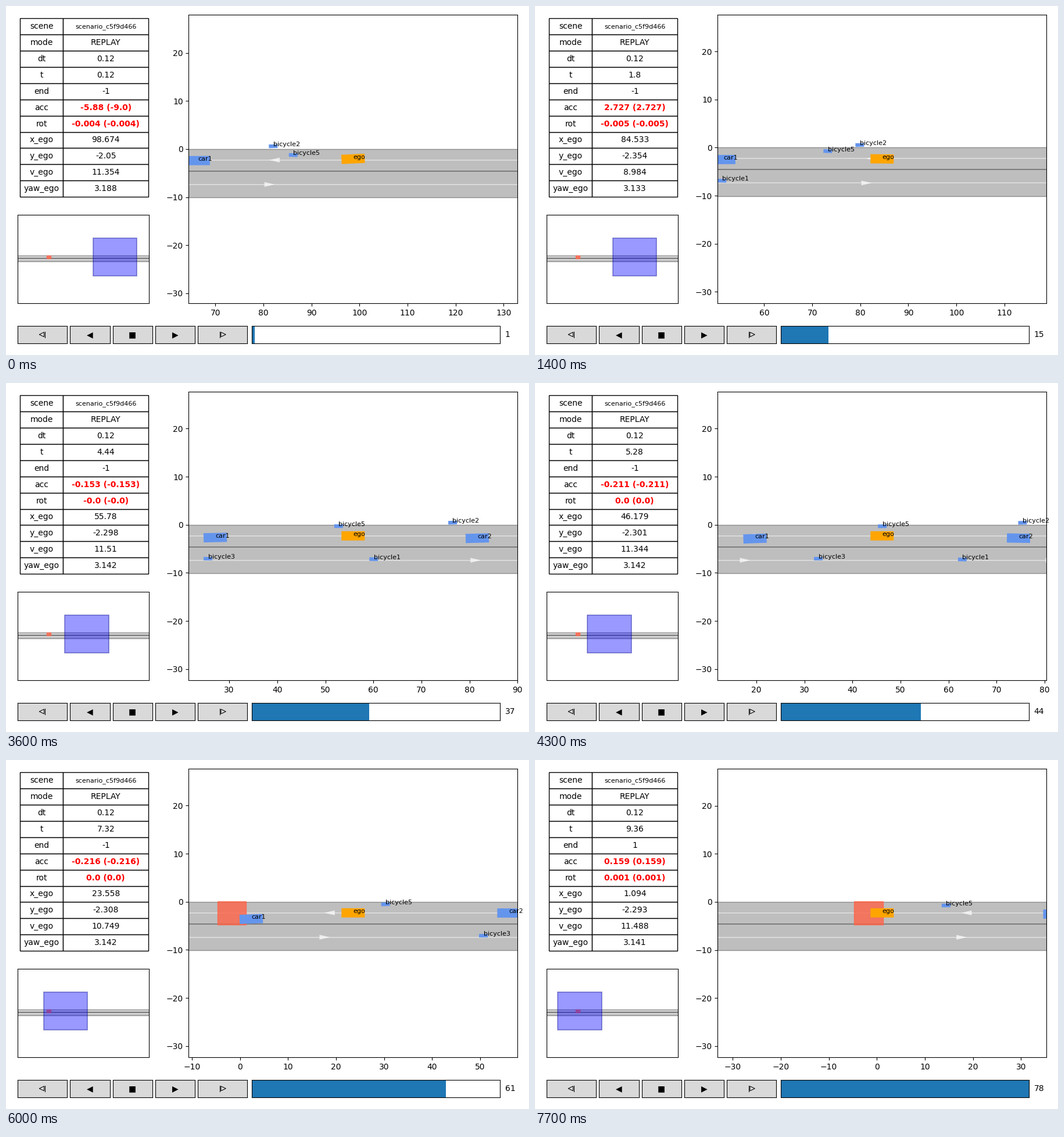
Animation of 900 by 600 pixels, one loop 7.8 s. Source, as a matplotlib script:

```python
import numpy as np
import matplotlib.pyplot as plt
from numpy.polynomial import Polynomial
from matplotlib.animation import FuncAnimation
from matplotlib.patches import Polygon, Rectangle

plt.rcParams["font.family"] = "DejaVu Sans"

W, H = 900, 600
STEPS, DT = 78, 0.12
VIEW_Y = 30
VIEW_X = VIEW_Y * 566 / 496
LANES = {-2.29: -1, -7.37: 1}  # lane centre: driving direction
CAR, BIKE = (4.84, 1.92), (1.8, 0.76)

# ego key states: t, x, y, speed, yaw, acceleration, yaw change per step
EGO = np.array([
    (0.12, 98.674, -2.050, 11.354, 3.188, -5.880, -0.004),
    (1.80, 84.533, -2.354, 8.984, 3.133, 2.727, -0.005),
    (3.36, 68.228, -2.273, 11.442, 3.143, 0.406, 0.001),
    (6.24, 35.382, -2.315, 11.151, 3.142, -0.205, -0.001),
    (9.36, 1.094, -2.293, 11.488, 3.141, 0.159, 0.001),
])

# name: (size, time span, waypoints as t, x, y)
ACTORS = {
    "car1": (CAR, (0, 8.2), [(0.12, 66.44, -2.41), (1.8, 51.57, -2.5),
                             (4.44, 27.08, -2.65), (7.32, 2.35, -3.58)]),
    "car2": (CAR, (2.3, 10), [(3.36, 89.88, -2.4), (4.44, 81.63, -2.78),
                              (7.32, 55.99, -2.34), (9.36, 37.05, -2.53)]),
    "bicycle1": (BIKE, (0, 10), [(1.8, 51.2, -6.9), (6.24, 66.1, -7.3)]),
    "bicycle2": (BIKE, (0, 10), [(0.12, 82.04, 0.58), (4.44, 76.49, 0.45)]),
    "bicycle3": (BIKE, (0, 10), [(4.44, 25.57, -7.03), (7.32, 50.73, -7.03)]),
    "bicycle5": (BIKE, (0, 10), [(0.12, 86.21, -1.26), (3.36, 61.15, -0.37),
                                 (9.36, 14.4, -0.75)]),
}


def quintic(u, T, start, end):
    """Position, velocity, acceleration at u in 0..1 between two full states."""
    (p0, v0, a0), (p1, v1, a1) = start, end
    d = p1 - p0 - v0 * T - a0 * T * T / 2
    e = (v1 - v0 - a0 * T) * T
    f = (a1 - a0) * T * T
    poly = Polynomial([p0, v0 * T, a0 * T * T / 2, 10 * d - 4 * e + f / 2,
                       -15 * d + 7 * e - f, 6 * d - 3 * e + f / 2])
    return poly(u), poly.deriv()(u) / T, poly.deriv(2)(u) / T ** 2


def axis_states(row):
    _, x, y, v, yaw, acc, rot = row
    c, s, w = np.cos(yaw), np.sin(yaw), rot / DT
    return (x, v * c, acc * c - v * s * w), (y, v * s, acc * s + v * c * w)


def ego_state(t):
    times = EGO[:, 0]
    k = np.clip(np.searchsorted(times, t - 1e-6) - 1, 0, len(times) - 2)
    T = times[k + 1] - times[k]
    u = (t - times[k]) / T
    (x, vx, ax), (y, vy, ay) = (
        quintic(u, T, a, b)
        for a, b in zip(axis_states(EGO[k]), axis_states(EGO[k + 1])))
    v = np.hypot(vx, vy)
    yaw = np.arctan2(vy, vx) % (2 * np.pi)
    acc = (vx * ax + vy * ay) / v
    rot = (vx * ay - vy * ax) / v ** 2 * DT
    return [float(n) for n in (x, y, v, yaw, acc, rot)]


def glide(t, points):
    """Point and velocity on a smooth path, straight beyond its ends."""
    points = np.array(points)
    ts, ps = points[:, 0], points[:, 1:]
    m = np.gradient(ps, ts, axis=0)
    if not ts[0] < t < ts[-1]:
        k = 0 if t <= ts[0] else -1
        return ps[k] + m[k] * (t - ts[k]), m[k]
    k = np.searchsorted(ts, t) - 1
    T = ts[k + 1] - ts[k]
    u, dp = (t - ts[k]) / T, ps[k + 1] - ps[k]
    a, b = m[k] * T, m[k + 1] * T
    c2, c3 = 3 * dp - 2 * a - b, a + b - 2 * dp
    return (ps[k] + u * (a + u * (c2 + u * c3)),
            (a + u * (2 * c2 + u * 3 * c3)) / T)


def corners(x, y, yaw, size):
    c, s = np.cos(yaw), np.sin(yaw)
    unit = np.array([(1, 1), (1, -1), (-1, -1), (-1, 1)])
    return unit * np.array(size) / 2 @ np.array([(c, s), (-s, c)]) + (x, y)


fig = plt.figure(figsize=(W / 100, H / 100), dpi=100, facecolor="white")


def panel(x0, y0, x1, y1, face="white", ticks=False):
    ax = fig.add_axes([x0 / W, 1 - y1 / H, (x1 - x0) / W, (y1 - y0) / H],
                      facecolor=face)
    if not ticks:
        ax.set(xticks=[], yticks=[])
    return ax


def pixel_layer():
    """Transparent axes over the page, in pixels, y pointing down."""
    ax = fig.add_axes([0, 0, 1, 1])
    ax.set(xlim=(0, W), ylim=(H, 0))
    ax.axis("off")
    return ax


def centred(ax, x, y, text, **style):
    return ax.text(x, y, text, ha="center", va="center", **style)


# table
COLS = (24.3, 98.3, 245.3)
TABLE_TOP, ROW_H = 21.3, 27.89
FIELDS = ("scene", "mode", "dt", "t", "end", "acc", "rot",
          "x_ego", "y_ego", "v_ego", "yaw_ego")
page = pixel_layer()
cells = {}
for row, field in enumerate(FIELDS):
    top = TABLE_TOP + row * ROW_H
    for left, right, text in zip(COLS, COLS[1:], (field, "")):
        page.add_patch(Rectangle((left, top), right - left, ROW_H,
                                 fc="white", ec="black", lw=1))
        cells[field] = centred(page, (left + right) / 2, top + ROW_H / 2, text)
cells["scene"].set(text="scenario_c5f9d466", fontsize=8)
cells["mode"].set_text("REPLAY")
cells["dt"].set_text(str(DT))
for field in ("acc", "rot"):
    cells[field].set(color="red", fontweight="bold")


def draw_road(ax):
    ax.axhspan(-10.1, 0, fc="#bebebe", ec="none", zorder=1)
    for y in LANES:
        ax.axhline(y, color="white", alpha=0.5, lw=1.2, zorder=1.1)
    for y in (0, -10.1):
        ax.axhline(y, color="#8f8f8f", lw=1, zorder=1.2)
    ax.axhline(-4.59, color="#707070", lw=1.2, zorder=1.2)
    ax.add_patch(Rectangle((-4.7, -4.7), 6, 4.76, fc="tomato", ec="tomato",
                           lw=1, alpha=0.8, zorder=1.5))


# main view
view = panel(314.3, 14.8, 880.3, 510.8, ticks=True)
draw_road(view)
for y, way in LANES.items():
    for x in (18.15, 81.8):
        x += 0.5 * (1 - way) / 2 - 0.5 * (1 + way) / 2
        view.add_patch(Polygon([(x - 1.09 * way, y + 0.5), (x + 1.09 * way, y),
                                (x - 1.09 * way, y - 0.5)],
                               fc="white", ec="none", alpha=0.7, zorder=1.3))


def make_actor(name, color, z):
    shape = view.add_patch(Polygon(np.zeros((4, 2)), fc=color, ec="none", zorder=z))
    return shape, view.annotate(name, (0, 0), fontsize=8, zorder=5)


def place(actor, x, y, yaw, size):
    shape, label = actor
    shape.set_xy(corners(x, y, yaw, size))
    label.xy = (x, y)
    label.set_position((x, y))


actors = {name: make_actor(name, "cornflowerblue", 2) for name in ACTORS}
ego = make_actor("ego", "orange", 3)

# overview map
overview = panel(20, 358.8, 246, 510.8)
draw_road(overview)
overview.set(xlim=(-49.3, 150.35), ylim=(-81.8, 70.2))
window = overview.add_patch(Rectangle((0, -34.8), 66.8, 65, fc=(0, 0, 1, 0.4),
                                      ec=(0, 0, 0.55, 0.4), lw=1.3, zorder=4))

# buttons: wide step buttons around three narrow ones
BAR_TOP, BAR_BOTTOM, GAP = 549.8, 579.8, 4.9
middle = (BAR_TOP + BAR_BOTTOM) / 2
icons = pixel_layer()
icons.set_zorder(5)


def step_icon(x, way):
    icons.add_patch(Polygon([(x - 3 * way, middle - 4), (x + 5.4 * way, middle),
                             (x - 3 * way, middle + 4)],
                            fc="none", ec="black", lw=0.75))
    bar = x - 4.8 * way
    icons.plot([bar, bar], [middle - 5, middle + 5], color="black", lw=0.75)


left = 20.0
for sign in ("<", "\u25c0", "\u25a0", "\u25b6", ">"):
    width = 85.2 if sign in "<>" else 68.5
    panel(left, BAR_TOP, left + width, BAR_BOTTOM, "0.85")
    if sign in "<>":
        step_icon(left + width / 2, 1 if sign == ">" else -1)
    else:
        centred(icons, left + width / 2, middle, sign)
    left += width + GAP

# slider
slider = panel(422.7, BAR_TOP, 850, BAR_BOTTOM)
slider.set(xlim=(0, STEPS), ylim=(0, 1))
fill = slider.add_patch(Rectangle((0, 0), 1, 1, fc="#1f77b4", ec="none"))
count = slider.text(1.02, 0.5, "", ha="left", va="center",
                    transform=slider.transAxes)


def update(i):
    t = DT * (i + 1)
    x, y, v, yaw, acc, rot = ego_state(t)

    view.set(xlim=(x - VIEW_X, x + VIEW_X), ylim=(y - VIEW_Y, y + VIEW_Y))
    place(ego, x, y, yaw, CAR)
    for name, (size, (first, last), points) in ACTORS.items():
        (px, py), (vx, vy) = glide(t, points)
        place(actors[name], px, py, np.arctan2(vy, vx), size)
        for artist in actors[name]:
            artist.set_visible(first <= t <= last)

    window.set_x(x - 33.4)
    fill.set_width(i + 1)
    count.set_text(str(i + 1))

    acc, rot = round(acc, 3), round(rot, 3)
    wish = -9.0 if i == 0 else acc
    values = {
        "t": round(t, 2),
        "end": 1 if i == STEPS - 1 else -1,
        "acc": f"{acc} ({wish})",
        "rot": f"{rot} ({rot})",
        "x_ego": round(x, 3),
        "y_ego": round(y, 3),
        "v_ego": round(v, 3),
        "yaw_ego": round(yaw, 3),
    }
    for field, value in values.items():
        cells[field].set_text(str(value))
    return []


anim = FuncAnimation(fig, update, frames=STEPS, interval=100, repeat=True,
                     repeat_delay=0, blit=False)
plt.show()
```
